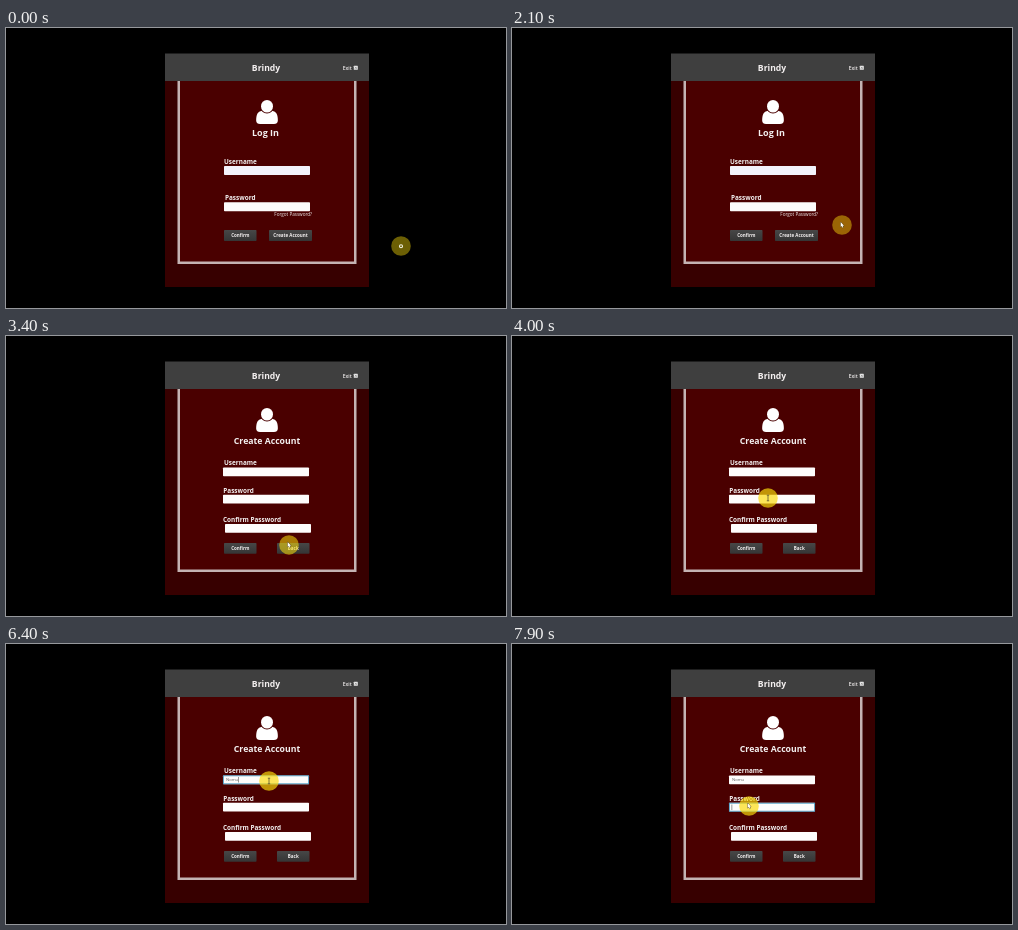
Animation, 500 px wide and 280 px high, one loop 8000 ms. Source, as an HTML page with a canvas:

```html
<!DOCTYPE html>
<html lang="en">
<head>
<meta charset="utf-8">
<title>Account form</title>
<style>
html, body { margin: 0; width: 100%; height: 100%; overflow: hidden; background: #000; }
canvas { display: block; width: 500px; height: 280px; }
</style>
</head>
<body>
<canvas id="stage"></canvas>
<script>
const canvas = document.getElementById('stage');
const ctx = canvas.getContext('2d');
const dpr = window.devicePixelRatio || 1;
canvas.width = 500 * dpr;
canvas.height = 280 * dpr;

const LOOP = 8000;
const SIGN_UP = 3200;
const FOCUS_NAME = 4700;
const FOCUS_PASS = 7600;
const TYPED = 'Nomu';
const KEY_TIMES = [5400, 5600, 5800, 6000];

// time, x, y, highlight opacity
const PATH = [
  [0, 395, 218, 0.43], [1650, 395, 218, 0.43], [2100, 330, 197, 0.46],
  [2500, 293, 206, 0.5], [2700, 283, 208, 0.54], [3450, 283, 209, 0.56],
  [4000, 256, 162, 0.68], [4300, 263, 137, 0.68],
  [7050, 263, 137, 0.68], [7500, 237, 162, 0.68], [LOOP, 237, 162, 0.68]
];

function pointerAt(t) {
  const i = PATH.findIndex((p, n) => n > 0 && t <= p[0]);
  const a = PATH[i - 1], b = PATH[i];
  const k = (t - a[0]) / (b[0] - a[0]);
  return [1, 2, 3].map(n => a[n] + (b[n] - a[n]) * k);
}

function rect(x, y, w, h, fill, r = 0) {
  ctx.fillStyle = fill;
  ctx.beginPath();
  ctx.roundRect(x, y, w, h, r);
  ctx.fill();
}

function text(str, x, y, size, { weight = 700, align = 'left', color = '#f4f0f0' } = {}) {
  ctx.font = `${weight} ${size}px "Open Sans", "Noto Sans", sans-serif`;
  ctx.textAlign = align;
  ctx.fillStyle = color;
  ctx.fillText(str, x, y);
}

function field(x, y, h, fill, focused) {
  rect(x, y, 86, h, fill, 0.8);
  if (!focused) return;
  ctx.strokeStyle = '#4a9cc4';
  ctx.lineWidth = 0.9;
  ctx.strokeRect(x + 0.4, y + 0.4, 85.2, h - 0.8);
}

function button(label, x, y, w, h) {
  const g = ctx.createLinearGradient(0, y, 0, y + h);
  g.addColorStop(0, '#474747');
  g.addColorStop(1, '#353535');
  rect(x, y, w, h, g, 0.8);
  text(label, x + w / 2, y + h / 2 + 1.7, 4.5, { align: 'center' });
}

function person() {
  ctx.fillStyle = '#fff';
  ctx.beginPath();
  ctx.moveTo(250.2, 93);
  ctx.bezierCurveTo(250, 87, 251.5, 83.5, 256, 82.8);
  ctx.lineTo(266, 82.8);
  ctx.bezierCurveTo(270.5, 83.5, 272, 87, 271.8, 93);
  ctx.quadraticCurveTo(271.5, 96, 268, 96);
  ctx.lineTo(254, 96);
  ctx.quadraticCurveTo(250.5, 96, 250.2, 93);
  ctx.fill();
  ctx.strokeStyle = '#4b0000';
  ctx.lineWidth = 1.8;
  ctx.beginPath();
  ctx.ellipse(261, 78.3, 6, 6.3, 0, 0, Math.PI * 2);
  ctx.stroke();
  ctx.fill();
}

function windowFrame() {
  rect(0, 0, 500, 280, '#000');
  rect(159, 26, 204, 233, '#370000');
  rect(171.5, 53, 179, 183, '#c4b3b3');
  rect(174, 53, 174, 180.5, '#4a0000');
  rect(159, 25.5, 204, 27.5, '#3f3f3f');
  text('Brindy', 260, 43, 8.6, { align: 'center' });
  text('Exit', 336.7, 41.6, 5, { weight: 600 });
  rect(347.8, 37.8, 4, 4, '#e8e8e8', 0.4);
  ctx.strokeStyle = '#777';
  ctx.lineWidth = 0.6;
  ctx.beginPath();
  ctx.moveTo(348.8, 38.8); ctx.lineTo(350.8, 40.8);
  ctx.moveTo(350.8, 38.8); ctx.lineTo(348.8, 40.8);
  ctx.stroke();
  person();
}

function loginPage() {
  text('Log In', 259.5, 108, 9, { align: 'center' });
  text('Username', 218, 135.6, 6.4);
  field(218, 138, 9, '#f3f2fb');
  text('Password', 219, 171.8, 6.4);
  field(218, 174.3, 9, '#fcfafa');
  text('Forgot Password?', 306, 188.2, 4.6, { weight: 400, align: 'right' });
  button('Confirm', 218, 202, 32.5, 11);
  button('Create Account', 263, 202, 43, 11);
}

function caret(x, y, age) {
  if (age % 1060 < 530) rect(x, y, 0.6, 5.6, '#555');
}

function signUpPage(t) {
  const onName = t >= FOCUS_NAME && t < FOCUS_PASS;
  const onPass = t >= FOCUS_PASS;
  text('Create Account', 261, 108, 8.7, { align: 'center' });
  text('Username', 218, 128.8, 6.4);
  field(217, 131.4, 8.8, '#fefcfc', onName);
  text('Password', 217.3, 156.6, 6.4);
  field(217, 158.8, 8.8, '#fefcfc', onPass);
  text('Confirm Password', 217, 185.8, 6.4);
  field(219, 188, 8.7, '#fefcfc');
  button('Confirm', 218, 207, 32.5, 10.7);
  button('Back', 271, 207, 32.5, 10.7);

  const keys = KEY_TIMES.filter(k => t >= k);
  const typed = TYPED.slice(0, keys.length);
  text(typed, 220, 137.3, 4.2, { weight: 400, color: '#666' });
  const end = 220 + ctx.measureText(typed).width;
  if (onName) caret(end + 0.2, 133, t - (keys.at(-1) || FOCUS_NAME));
  if (onPass) caret(219.6, 160.4, t - FOCUS_PASS);
}

function arrow(x, y) {
  ctx.beginPath();
  ctx.moveTo(x - 1.3, y - 3);
  ctx.lineTo(x - 1.3, y + 2);
  ctx.lineTo(x - 0.2, y + 1.1);
  ctx.lineTo(x + 0.6, y + 2.7);
  ctx.lineTo(x + 1.3, y + 2.3);
  ctx.lineTo(x + 0.6, y + 0.8);
  ctx.lineTo(x + 2, y + 0.7);
  ctx.closePath();
  ctx.strokeStyle = '#4a3a10';
  ctx.lineWidth = 0.7;
  ctx.stroke();
  ctx.fillStyle = '#fff';
  ctx.fill();
}

function beam(x, y) {
  ctx.strokeStyle = '#5c5430';
  ctx.lineWidth = 0.8;
  ctx.beginPath();
  ctx.moveTo(x - 1.2, y - 2.8); ctx.lineTo(x + 1.2, y - 2.8);
  ctx.moveTo(x, y - 2.8); ctx.lineTo(x, y + 2.8);
  ctx.moveTo(x - 1.2, y + 2.8); ctx.lineTo(x + 1.2, y + 2.8);
  ctx.stroke();
}

function pointer(t) {
  const [x, y, alpha] = pointerAt(t);
  ctx.fillStyle = `rgba(250, 220, 10, ${alpha})`;
  ctx.beginPath();
  ctx.arc(x, y, 9.8, 0, Math.PI * 2);
  ctx.fill();
  if (t < 1700) {
    ctx.strokeStyle = '#f4f4e8';
    ctx.lineWidth = 1.1;
    ctx.beginPath();
    ctx.arc(x, y + 0.3, 1.5, 0, Math.PI * 2);
    ctx.stroke();
  } else if (t >= 4000 && t < 7100) {
    beam(x, y);
  } else {
    arrow(x, y);
  }
}

function draw(t) {
  ctx.setTransform(dpr, 0, 0, dpr, 0, 0);
  windowFrame();
  if (t < SIGN_UP) loginPage();
  else signUpPage(t);
  pointer(t);
}

const start = performance.now();
function tick() {
  const t = (performance.now() - start) % LOOP;
  draw(Math.floor(t / 100) * 100);
  requestAnimationFrame(tick);
}
tick();
</script>
</body>
</html>
```
